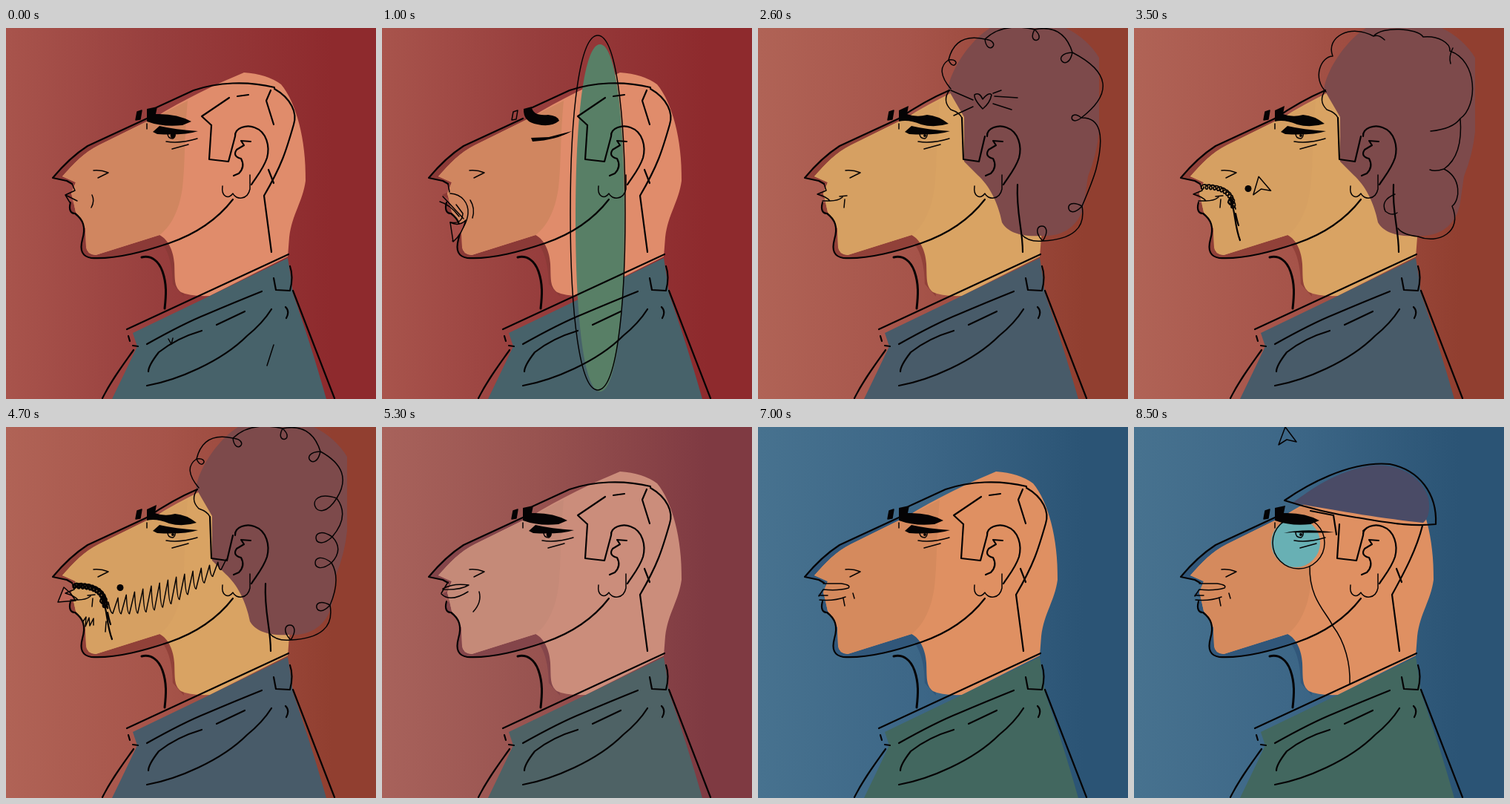
Write an HTML page that moves like this. It is 499 px wide and 500 px high and loops after 8600 ms.

```html
<!DOCTYPE html>
<html lang="en">
<head>
<meta charset="utf-8">
<title>Profile</title>
<style>
html, body { margin: 0; width: 100%; height: 100%; overflow: hidden; }
svg { display: block; width: 100vw; height: 100vh; }
.l { fill: none; stroke: #050304; stroke-width: 2.2; stroke-linecap: round; stroke-linejoin: round; }
.t { stroke-width: 1.5; }
.b { fill: #050304; }
</style>
</head>
<body>
<svg viewBox="0 0 499 500" preserveAspectRatio="none">
  <defs>
    <linearGradient id="bg">
      <stop offset="0"/><stop offset=".42"/><stop offset=".88"/>
    </linearGradient>
  </defs>
  <rect width="499" height="500" fill="url(#bg)"/>

  <path id="shade" d="M190 122L110 159C96 168 78 184 63 202L89 209L93 219L81 225L96 234L87 236Q84 246 93 250C104 258 108 268 103 285C99 300 103 308 115 310C150 312 185 302 211 291Q224 308 225 345L240 362L232 290L250 100Z"/>
  <path id="neck" d="M76 200C92 182 105 168 125 158L200 121C240 96 285 75 321 60Q352 62 371 76C391 100 405 150 404 206C400 235 386 250 382 282L380 308L275 361Q248 362 236 356C226 348 228 337 227 318C226 301 219 285 207 279L121 306Q109 305 108 295L107 270Q102 257 94 248L90 230L88 223L94 208Z"/>
  <path id="face" d="M76 200C92 182 105 168 125 158L200 121L245 98C240 150 242 180 238 215C234 245 223 267 207 279L121 306Q109 305 108 295L107 270Q102 257 94 248L90 230L88 223L94 208Z"/>
  <path id="shirt" d="M380 310L275 361L171 411L177 429Q160 465 143 500H432C418 450 402 400 387 358L384 335Z"/>
  <path id="hairFill" fill="#7d4a4b" d="M256 82C262 50 290 14 313 0H415Q444 14 460 40V140Q457 170 445 200L440 235C436 262 416 282 382 280C352 282 336 274 329 262C324 236 312 212 296 198L278 180V120L264 96Z"/>
  <path id="discFill" fill="#587f66"/>

  <g id="hat">
    <path fill="#4a4b66" d="M214 102C238 85 272 59 320 52C360 48 390 70 397 96Q401 120 390 129C340 124 280 114 214 102Z"/>
    <path class="l" d="M203 99C230 80 290 45 345 50C385 58 409 90 407 131C370 135 340 128 300 122C260 116 225 106 203 99Z"/>
  </g>
  <g id="monocle">
    <circle cx="218" cy="156" r="33" fill="#68b0b4"/>
    <circle class="l t" cx="222" cy="156" r="35"/>
    <path class="l t" d="M237 188C236 232 260 250 268 268C285 290 292 320 291 346"/>
  </g>

  <g class="l">
    <path d="M190 122L110 159C96 168 78 184 63 202L82 206L89 210"/>
    <path d="M87 235C84 246 88 250 93 250C104 258 108 268 103 285C99 300 103 308 115 310C150 312 190 300 220 290C255 278 285 258 306 231"/>
    <path class="t" d="M118 192Q128 191 138 195L124 202"/>
    <path d="M309 146C308 134 325 130 335 134C352 140 356 160 352 175C347 190 338 200 331 211"/>
    <path d="M330 153L317 152L321 158L311 164Q305 173 317 176Q323 187 314 196L307 199"/>
    <path class="t" d="M292 213C290 228 300 231 306 223C310 232 326 232 329 217V198"/>
    <path stroke-width="3" d="M183 309C196 306 206 314 211 328C217 345 216 360 214 378"/>
    <path d="M163 406L381 305M165 415L167 422M171 428L178 429M190 426C215 412 240 398 270 386Q310 369 345 355M284 400L322 382M192 463Q192 455 206 437Q230 418 264 408M190 482C230 475 290 450 325 415Q346 398 358 379"/>
    <path class="t" id="creases" d="M219 419L223 426L225 418M361 427L352 455"/>
    <path d="M361 337L364 353L383 354Q388 335 383 321M377 376Q383 382 378 391M387 354L443 499M172 434C155 458 142 475 130 499"/>
  </g>

  <g class="l">
    <path id="skull" d="M203 107L253 84C285 73 325 71 362 80M357 84L351 98L361 130M362 82C385 95 393 115 388 130C378 165 372 185 348 226M312 92L327 90M301 94L264 119L277 131"/>
    <path id="nape" d="M389 133C381 165 365 195 348 226"/>
    <path id="band" d="M238 113L269 119L273 145M309 140L314 136"/>
    <path id="burn" d="M277 131L274 177L300 180L309 146"/>
    <path id="neckLine" d="M354 191L361 209M348 226L358 302"/>
    <g id="hairLine">
      <path d="M190 122Q225 98 258 84M275 121L277 177L298 180L306 146M357 302C357 270 348 250 350 211"/>
      <path class="t" d="M258 84Q248 98 260 110Q272 114 275 121"/>
      <path class="t" id="curls"/>
    </g>
  </g>

  <g id="heart" class="l t">
    <path d="M303 109Q291 96 292 90Q299 86 303 96Q311 86 315 90Q313 101 303 109ZM290 97L260 84M290 106L264 118M317 88L328 84M319 92L350 94M317 102L342 110"/>
  </g>
  <circle id="mole" class="b" cx="154" cy="216.500" r="4.5"/>
  <path id="tache" class="l" pathLength="1" stroke-dasharray="1 2"/>
  <path id="strand" class="l" d="M130 232C137 245 135 265 143 286M127 235Q133 243 133 233Q129 226 127 235M137 250Q139 260 141 266"/>
  <path id="goatee" class="l t" d="M104 262L108 256L107 269L112 257L113 268L118 258L118 267M135 262L134 276"/>
  <path id="beard" class="l t" pathLength="1" stroke-dasharray="1 2"/>
  <path id="pout" class="l t" style="fill:#bd6658" d="M78 216L70 236L81 235L94 234L87 224Z"/>

  <path id="mouth" class="l t"/>
  <path id="openMouth" class="l t" style="fill:#a9504a" d="M92 262Q104 268 113 259Q108 278 96 288Z"/>
  <path id="farBrow" class="l t" d="M177 113L183 111L181 123L175 124Z"/>
  <path id="brow" class="b"/>
  <path id="eye" class="b"/>
  <g id="open" class="l t">
    <path d="M218 142Q218 149 225 149Q229 147 228 142M216 153Q235 156 258 149M224 163L246 157M190 129V136"/>
    <circle class="b" id="pupil" cx="225" cy="145" r="2"/>
  </g>
  <path id="discLine" class="l t"/>
  <path id="star" class="l t" d="M282 233L291 241L298 246L288 250L275 248L283 244Z"/>
  <path id="arrow" class="l t" d="M-3 -12L-12 12L-1 5L12 8Z"/>
</svg>
<script>
const LOOP = 8600;
const $ = id => document.getElementById(id);
const set = (id, k, v) => $(id).setAttribute(k, v);
const show = (id, on) => set(id, 'display', on ? 'inline' : 'none');
const clamp = v => Math.max(0, Math.min(1, v));
const span = (t, a, b) => clamp((t - a) / (b - a));
const ease = p => p * p * (3 - 2 * p);
const mix = (a, b, p) => a + (b - a) * p;

const scenes = [
  { end: 2200, bg: ['#a8544c', '#973e3d', '#8e2a2d'], face: '#d08660', neck: '#e08c6b', shirt: '#47626a', shade: '#8b3a37' },
  { end: 5100, bg: ['#b06356', '#a6544a', '#913f30'], face: '#d6a062', neck: '#d9a363', shirt: '#485b69', shade: '#914139' },
  { end: 6800, bg: ['#a8625b', '#985350', '#7f3a42'], face: '#c58a78', neck: '#cb8d7b', shirt: '#4e6265', shade: '#84454a' },
  { end: LOOP, bg: ['#47728f', '#3d6787', '#2b5475'], face: '#d58a5d', neck: '#df9062', shirt: '#42675f', shade: '#31577a' }
];

const mouths = {
  calm: 'M89 210L93 219L80 225L96 233M116 225Q120 233 115 242M80 225L86 235',
  talk: 'M89 210L91 221M92 223C108 224 117 236 116 250C115 263 107 275 95 287M78 234Q92 238 104 254M82 227L110 257M92 262Q108 265 109 250L100 238M119 232Q126 243 122 256',
  smile: 'M89 210L92 219L80 224Q92 227 97 233Q108 233 114 228M110 227L120 226M117 231L116 242M87 233L96 233',
  lips: 'M89 209L80 224M82 218Q96 210 117 213Q106 220 82 219M80 225Q92 237 116 222M131 222Q135 236 123 249',
  wry: 'M88 211H112Q126 213 122 217Q108 221 88 219L82 228M82 227H94M83 233Q102 235 118 229M128 224L130 231M115 231L117 241'
};
const brows = {
  flat: 'M190 109L204 106L202 116Q230 115 250 126L238 131Q212 134 190 126Z',
  arch: 'M191 109L202 106Q203 119 224 117Q237 118 239 125Q228 134 210 130Q190 127 191 109Z',
  wave: 'M190 111L203 105L201 116Q214 121 228 117Q243 118 257 129Q238 135 220 130Q203 123 190 126Z'
};
const eyes = {
  open: 'M198 140L207 132Q228 137 259 139Q240 145 204 143Z',
  shut: 'M201 148L225 147L256 139Q235 151 203 153Z',
  slim: 'M202 143Q230 136 270 142Q238 143 214 142Z'
};

// Each curl: control point of the arc before it, crossing point, inward angle, size
const crown = [
  [238, 56, 257, 43, 30, 6], [266, 6, 306, 15, 45, 8],
  [330, -8, 373, 2, 80, 8], [412, -6, 424, 33, 140, 10]
];
const tail = [[452, 205, 437, 240, 170, 10], [445, 284, 384, 287, 265, 11]];
const wide = [...crown, [500, 72, 436, 121, 180, 7], [474, 120, 456, 190, 180, 0], ...tail];
const tight = [
  ...crown, [470, 58, 446, 96, 160, 17], [464, 120, 440, 148, 175, 12],
  [456, 165, 439, 183, 180, 12], ...tail
];
function curlPath(curls) {
  let d = 'M260 82';
  for (const [cx, cy, x, y, deg, r] of curls) {
    const at = off => {
      const a = (deg + off) * Math.PI / 180;
      return `${(x + 3.1 * r * Math.cos(a)).toFixed(1)} ${(y + 3.1 * r * Math.sin(a)).toFixed(1)}`;
    };
    d += `Q${cx} ${cy} ${x} ${y}C${at(-38)} ${at(38)} ${x} ${y}`;
  }
  return d + 'Q365 289 355 278';
}
const hairs = {
  wide: curlPath(wide),
  tight: curlPath(tight),
  cloud: 'M259 86C240 68 252 38 268 38C258 12 292 -6 323 11C335 -3 382 0 390 12C410 10 427 20 426 31C464 44 464 105 440 122Q444 172 418 190C442 202 440 232 429 240C444 275 410 292 383 281Q363 279 356 270M430 27Q424 39 427 48M440 122Q430 136 400 139M323 11Q330 8 338 16M418 190Q406 194 399 191M352 224Q332 232 339 247Q348 254 355 249'
};

function tachePath() {
  let d = '';
  for (let i = 0; i <= 100; i++) {
    const p = i / 100, a = p * Math.PI * 24;
    const x = mix(91, 134, Math.sin(p * 1.57)) + 3 * Math.cos(a);
    const y = 214 + 30 * p ** 2.5 + 3.2 * Math.sin(a);
    d += (i ? 'L' : 'M') + x.toFixed(1) + ' ' + y.toFixed(1);
  }
  return d;
}
function beardPath() {
  const n = 14;
  let d = 'M138 236';
  for (let i = 0; i < n; i++) {
    const p = i / (n - 1), x = mix(140, 286, p);
    const top = mix(234, 182, p), low = top + 8 + 25 * Math.sin(Math.PI * clamp(p * .85 + .12));
    d += `Q${x + 1} ${low} ${x + 4} ${low}L${x + 11} ${mix(234, 182, p + 1 / n)}`;
  }
  return d;
}
set('tache', 'd', tachePath());
set('beard', 'd', beardPath());

// Narrow oval, as a disc seen from the side
const oval = (x, rx, y0, y1) => {
  const m = (y0 + y1) / 2, k = (y1 - y0) * .29;
  return `M${x} ${y0}C${x + rx * .65} ${y0} ${x + rx} ${m - k} ${x + rx} ${m}S${x + rx * .65} ${y1} ${x} ${y1}S${x - rx} ${m + k} ${x - rx} ${m}S${x - rx * .65} ${y0} ${x} ${y0}Z`;
};

function draw(t) {
  const n = scenes.findIndex(s => t < s.end), s = scenes[n];
  document.querySelectorAll('#bg stop').forEach((e, i) => e.setAttribute('stop-color', s.bg[i]));
  for (const k of ['face', 'neck', 'shirt', 'shade']) set(k, 'fill', s[k]);
  show('creases', t < 500);

  const hair = n === 1, drop = ease(span(t, 7200, 7700));
  const hat = n === 3 && drop > 0, worn = drop === 1;
  show('hairFill', hair);
  show('hairLine', hair);
  show('skull', !hair && !worn);
  show('nape', worn);
  show('band', worn);
  show('burn', !hair);
  show('neckLine', !hair);
  set('curls', 'd', hairs[t < 3000 ? 'wide' : t < 4000 ? 'cloud' : 'tight']);

  show('hat', hat);
  set('hat', 'transform', `translate(0 ${mix(-140, 0, drop)})`);
  show('monocle', t >= 7900);

  const disc = t >= 700 && t < 1400;
  show('discFill', disc);
  show('discLine', disc);
  const w = Math.cos((t - 1000) / 400 * 1.2);
  set('discFill', 'd', oval(294, 33 * w, 22, 490));
  set('discLine', 'd', oval(291, 37 * w, 10, 488));

  show('heart', t >= 2400 && t < 2900);
  show('mole', hair && t >= 3400);
  show('tache', hair && t >= 2900);
  set('tache', 'stroke-dashoffset', 1 - span(t, 2800, 3400));
  $('tache').style.strokeWidth = t < 4000 ? 1.7 : 2.8;
  show('strand', hair && t >= 3400);
  show('goatee', hair && t >= 4000);
  show('beard', hair && t >= 3900);
  set('beard', 'stroke-dashoffset', 1 - span(t, 3800, 4600));

  const talk = t >= 700 && t < 1500 && t % 400 < 300;
  show('pout', t >= 4500 && t < 4900);
  show('openMouth', talk);
  set('mouth', 'd', mouths[talk ? 'talk' : ['calm', 'smile', 'lips', 'wry'][n]]);

  const nap = t >= 900 && t < 1200;
  const shut = nap || t % 2100 >= 1900 && t % 2100 < 2000;
  set('brow', 'd', brows[nap ? 'arch' : hair ? 'wave' : 'flat']);
  set('eye', 'd', eyes[shut ? 'shut' : t >= 7900 ? 'slim' : 'open']);
  show('open', !shut);
  set('pupil', 'r', hair || n === 3 ? 1.2 : 2.6);
  $('farBrow').style.fill = nap ? 'none' : '#050304';

  show('star', t >= 5700 && t < 6400);
  const near = t >= 3300 && t < 3800, away = t >= 8200;
  show('arrow', near || away);
  const p = span(t, 3300, 3500), q = span(t, 8200, 8500);
  set('arrow', 'transform', near
    ? `translate(${mix(190, 172, p)} ${mix(220, 212, p)}) rotate(-4)`
    : `translate(${mix(226, 207, q)} ${mix(50, 12, q)})`);
}

let last = -1;
function tick() {
  const t = Math.floor(performance.now() % LOOP / 100) * 100;
  if (t !== last) draw(last = t);
  requestAnimationFrame(tick);
}
tick();
</script>
</body>
</html>
```
